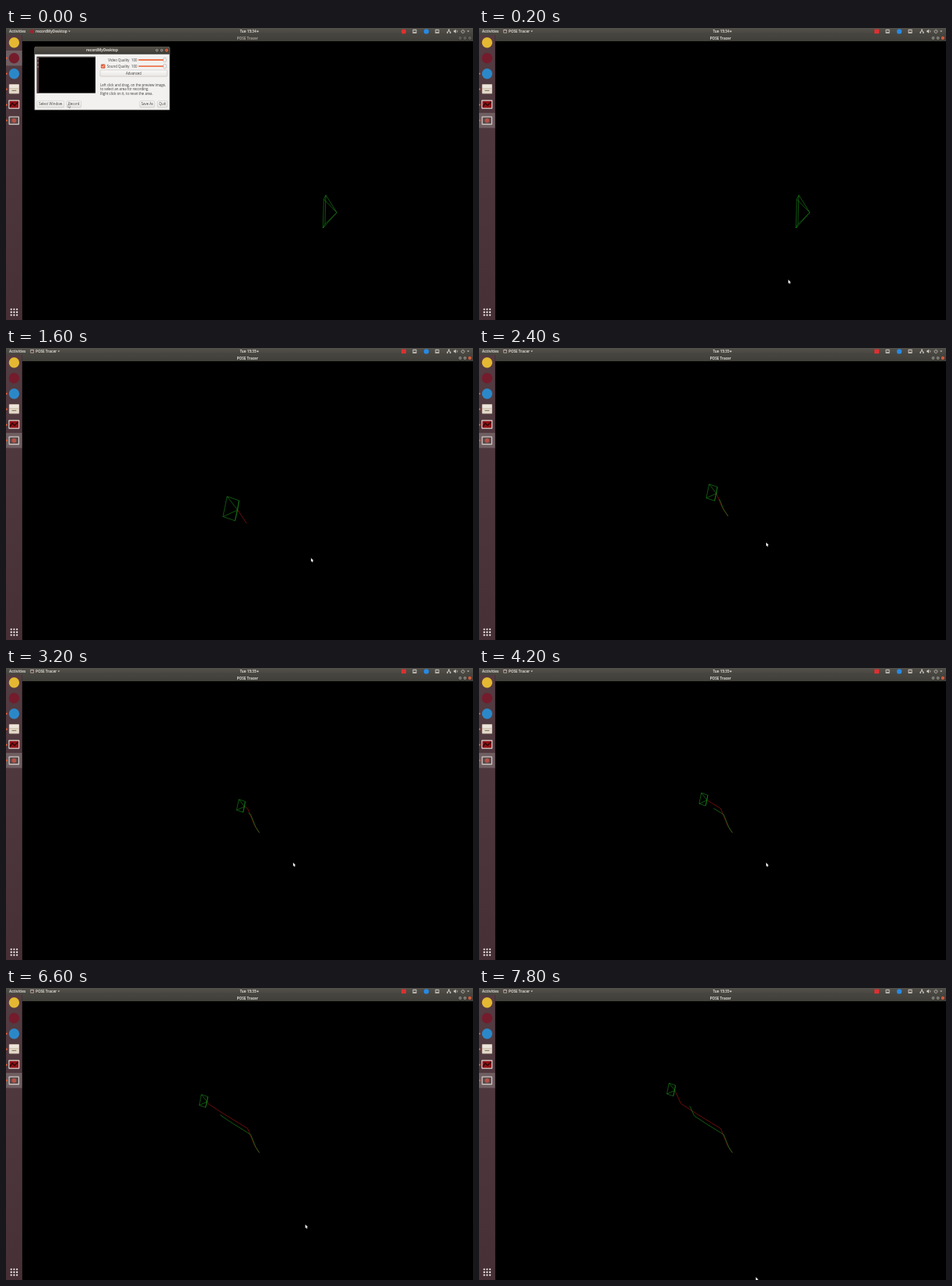
Animation of 600x375 px, one loop 8 s. Source, as an HTML page with a canvas:

```html
<!DOCTYPE html>
<html lang="en">
<head>
<meta charset="utf-8">
<title>Camera path</title>
<style>
html, body { margin: 0; width: 100%; height: 100%; overflow: hidden; background: #000; }
canvas { display: block; width: 600px; height: 375px; }
</style>
</head>
<body>
<canvas id="stage"></canvas>
<script>
const LOOP = 8000, STEP = 200;
const APP = 'POSE Tracer';
const GREEN = '#1a821a', RED = '#a61414', ORANGE = '#e6603a', PALE = '#d3d0c9';
const canvas = document.getElementById('stage');
const ctx = canvas.getContext('2d');
const ratio = window.devicePixelRatio || 1;
canvas.width = 600 * ratio;
canvas.height = 375 * ratio;
ctx.scale(ratio, ratio);

// Key points: time, x, y.
const origin = [[200, 425, 237], [1600, 309, 225], [2800, 325.5, 211.5]];
const cameraPath = [
  [200, 0, 0], [1600, -6, -9], [2900, -15, -31],
  [5200, -46, -50], [6400, -66, -63], [7800, -74, -80]
];
const pointer = [
  [200, 397.5, 323.5], [1600, 392, 270], [2400, 369, 250],
  [5200, 369, 250.5], [6600, 384.7, 304], [7400, 355.8, 371.5]
];

const progress = (t, from, to) => Math.min(1, Math.max(0, (t - from) / (to - from)));
const mix = (a, b, k) => a.map((v, i) => v + (b[i] - v) * k);

function sample(track, t) {
  const next = track.findIndex(row => row[0] > t);
  if (next <= 0) return track.at(next).slice(1);
  const [a, b] = [track[next - 1], track[next]];
  return mix(a, b, progress(t, a[0], b[0])).slice(1);
}

function rect(x, y, w, h, fill) {
  ctx.fillStyle = fill;
  ctx.fillRect(x, y, w, h);
}

function rounded(x, y, w, h, r, fill, stroke) {
  ctx.beginPath();
  ctx.roundRect(x, y, w, h, r);
  ctx.fillStyle = fill;
  ctx.fill();
  if (stroke) {
    ctx.strokeStyle = stroke;
    ctx.lineWidth = .5;
    ctx.stroke();
  }
}

function disc(x, y, r, fill) {
  ctx.beginPath();
  ctx.arc(x, y, r, 0, 7);
  ctx.fillStyle = fill;
  ctx.fill();
}

function arc(x, y, r, from, to) {
  ctx.beginPath();
  ctx.arc(x, y, r, from, to);
  ctx.strokeStyle = PALE;
  ctx.lineWidth = .7;
  ctx.stroke();
}

function line(points, stroke, width = .65, close = false) {
  ctx.beginPath();
  points.forEach(([x, y]) => ctx.lineTo(x, y));
  if (close) ctx.closePath();
  ctx.strokeStyle = stroke;
  ctx.lineWidth = width;
  ctx.stroke();
}

function shape(points, fill) {
  ctx.beginPath();
  points.forEach(([x, y]) => ctx.lineTo(x, y));
  ctx.fillStyle = fill;
  ctx.fill();
}

function text(value, x, y, { size = 4.4, fill = '#3c3c3c', align = 'left', bold = false } = {}) {
  ctx.font = `${bold ? 'bold ' : ''}${size}px "Open Sans", "Noto Sans", sans-serif`;
  ctx.textAlign = align;
  ctx.fillStyle = fill;
  ctx.fillText(value, x, y);
  return ctx.measureText(value).width;
}

function vertical(y0, y1, from, to) {
  const gradient = ctx.createLinearGradient(0, y0, 0, y1);
  gradient.addColorStop(0, from);
  gradient.addColorStop(1, to);
  return gradient;
}

const caret = (x, y) => shape([[x, y], [x + 2.6, y], [x + 1.3, y + 1.6]], PALE);

function windowButtons(x, y, active) {
  for (let i = 0; i < 3; i++) {
    const cx = x + i * 6.2;
    disc(cx, y, 2.5, '#33322e');
    disc(cx, y, 2.1, !active ? '#65635c' : i === 2 ? ORANGE : '#85827a');
    rect(cx - .8, y - .2, 1.6, .5, '#3b3a35');
  }
}

function statusIcons() {
  for (const x of [525, 554]) {
    rounded(x - 2.6, 1.8, 5.2, 5.2, .6, '#bab7b0');
    rect(x - 1.6, 3.1, 3.2, 2, '#55534d');
  }
  disc(540, 4.4, 3.2, '#2789e4');
  for (const dx of [-1.8, 1.8]) {
    line([[569, 2.3], [569, 4.3], [569 + dx, 4.3], [569 + dx, 6]], PALE, .7);
    rect(568.2 + dx, 5.3, 1.6, 1.5, PALE);
  }
  rect(568.2, 1.6, 1.6, 1.5, PALE);
  shape([[575.3, 3.3], [576.4, 3.3], [578, 1.8], [578, 6.8], [576.4, 5.3], [575.3, 5.3]], PALE);
  arc(578, 4.3, 1.8, -1, 1);
  arc(587, 4.5, 2, -1, 4.1);
  line([[587, 1.7], [587, 4]], PALE, .7);
  caret(592.5, 3.6);
}

function bars(t, recording) {
  const label = { size: 4.6, fill: '#d6d3cc', bold: true };
  rect(0, 0, 600, 9, vertical(0, 9, '#53514a', '#45433d'));
  text('Activities', 4, 5.9, label);
  if (recording) {
    rounded(31.3, 2, 4.6, 4.4, .4, '#bcb8b1');
    rect(32, 3.2, 3.2, 2.5, '#5b403c');
    rect(508, 1.6, 6, 5.5, '#dc3030');
  } else {
    disc(33.5, 4.3, 2.6, '#9c2430');
    disc(511, 4.5, 3.1, '#e02f2f');
  }
  const width = text(recording ? APP : 'recordMyDesktop', 38, 5.9, label);
  caret(39.3 + width, 3.6);
  text(t < 1000 ? 'Tue 15:34' : 'Tue 15:35', 311, 5.9, { ...label, align: 'center' });
  disc(323.4, 4.3, 1.1, PALE);
  statusIcons();

  rect(21, 9, 579, 8, vertical(9, 17, '#474540', '#3f3e39'));
  text(APP, 310.3, 14.5, {
    ...label, align: 'center', fill: recording ? '#dedad2' : '#a5a198'
  });
  windowButtons(583.5, 12.9, recording);
}

function dock(recording) {
  const slot = i => 18.7 + i * 20;
  rect(0, 9, 21, 366, vertical(9, 375, '#533c42', '#463036'));
  rect(20.4, 9, .6, 366, '#3a282d');
  rect(0, slot(recording ? 5 : 1) - 9.7, 20.5, 19.4, '#6f5e62');

  ['#e4b832', '#741c2b', '#2b88c8'].forEach((fill, i) => disc(10.4, slot(i), 6.7, fill));

  rounded(3.8, 72, 13.2, 12.6, 1, '#c7b6a2');
  rect(4.5, 73, 11.8, 4.3, '#ece5db');
  rect(4.5, 78.2, 11.8, 5.5, '#e4d9ca');
  rect(7.5, 79.8, 5.8, 1.2, '#8c7b6a');

  rounded(3.3, 92.5, 14, 11.3, .8, '#e4dfda');
  rect(4.4, 93.7, 11.8, 8.9, '#8f1117');
  line([[5, 101], [8, 96.5], [11, 99.5], [15.5, 95]], '#2b0709', 1.4);

  rounded(3.5, 113.4, 13.5, 10.8, .8, '#d3cdc8');
  rect(4.7, 114.7, 11.1, 8.2, '#57494a');
  disc(10.3, 118.8, 2.9, '#b65249');

  for (let i = recording ? 2 : 1; i < 6; i++) disc(.8, slot(i), 1.1, ORANGE);
  for (let i = 0; i < 9; i++) {
    disc(6.7 + i % 3 * 3.7, 361.3 + Math.floor(i / 3) * 3.7, 1.15, '#eeebeb');
  }
}

// The image plane starts edge-on and turns to face the viewer.
function imagePlane(t) {
  const turn = progress(t, 200, 1600);
  const [cx, cy] = mix([-5.5, -.4], [-4.6, -1], turn);
  const [rx, ry] = mix([.45, -.9], [4.1, 1.4], turn);
  const [ux, uy] = mix([.2, -6.4], [1.4, -6.9], turn);
  return [[-1, 1], [1, 1], [1, -1], [-1, -1]]
    .map(([r, u]) => [cx + r * rx + u * ux, cy + r * ry + u * uy]);
}

function scene(t) {
  const [ox, oy] = sample(origin, t);
  const zoom = 2.9 - 1.9 * progress(t, 200, 2800);
  const toScreen = ([x, y]) => [ox + x * zoom, oy + y * zoom];
  const camera = sample(cameraPath, t);
  const trail = [...cameraPath.filter(row => row[0] <= t).map(row => row.slice(1)), camera];

  line(trail.map(toScreen), RED);
  // The estimated path has the same form but drifts short.
  if (t > 1600) line(trail.map(([x, y]) => toScreen([x * .74, y * .75])), GREEN, .7);

  const apex = toScreen(camera);
  const plane = imagePlane(t).map(([x, y]) => [apex[0] + x * zoom, apex[1] + y * zoom]);
  line(plane, GREEN, .65, true);
  plane.forEach(corner => line([apex, corner], GREEN));
}

function button(x, y, w, h, label) {
  rounded(x, y, w, h, 1, vertical(y, y + h, '#fbfaf9', '#e7e5e2'), '#bbb6b0');
  text(label, x + w / 2, y + h / 2 + 1.5, { align: 'center' });
}

function dialog() {
  rounded(36.7, 24, 173.6, 81.3, [2, 2, 0, 0], '#f2f1f0', '#44423d');
  rounded(36.7, 24, 173.6, 9.7, [2, 2, 0, 0], vertical(24, 33.7, '#555249', '#3d3b36'));
  text('recordMyDesktop', 123.5, 30.2, { size: 4.6, bold: true, fill: '#e2ded6', align: 'center' });
  windowButtons(193.9, 28.6, true);

  rect(39.7, 36.8, 75.2, 46.8, '#000');
  rect(39.7, 36.8, 75.2, 1.2, '#4b4944');
  rect(39.7, 38, 2.6, 45.6, '#49343a');
  for (let i = 0; i < 6; i++) rect(40.3, 39 + i * 2.6, 1.4, 1.2, i % 2 ? '#8c2832' : '#b5a493');

  ['Video Quality', 'Sound Quality'].forEach((label, i) => {
    const y = 41 + i * 8.1;
    text(label, 158.5, y + 1.6, { align: 'right' });
    text('100', 161, y + 1.6);
    rounded(170, y - .9, 34, 1.8, .9, '#ed764d');
    rounded(202.2, y - 2.6, 3.8, 5.2, 1.2, '#f4f2f0', '#9f9992');
  });
  rounded(122.3, 46.8, 4.8, 4.8, .6, ORANGE, '#bd4c28');
  line([[123.3, 49.2], [124.4, 50.4], [126.2, 47.8]], '#fff', .7);
  [
    'Left click and drag, on the preview image,',
    'to select an area for recording.',
    'Right click on it, to reset the area.'
  ].forEach((row, i) => text(row, 121, 75 + i * 5.3));
  button(121, 54, 86, 8.2, 'Advanced');
  button(40, 93.8, 34.4, 8.2, 'Select Window');
  button(78, 93.8, 18.4, 8.2, 'Record');
  button(172, 93.8, 18.8, 8.2, 'Save As');
  button(194.7, 93.8, 12.4, 8.2, 'Quit');
}

function arrow([x, y], edge) {
  const outline = [[0, 0], [0, 4.2], [.9, 3.4], [1.6, 5], [2.3, 4.7], [1.7, 3.2], [2.9, 3.1]]
    .map(([dx, dy]) => [x + dx, y + dy]);
  shape(outline, '#fff');
  line(outline, edge, .3, true);
}

function draw(elapsed) {
  const t = Math.floor(elapsed % LOOP / STEP) * STEP;
  const recording = t >= STEP;
  rect(0, 0, 600, 375, '#000');
  scene(t);
  bars(t, recording);
  dock(recording);
  if (!recording) dialog();
  arrow(recording ? sample(pointer, t) : [80, 98], recording ? '#ddd' : '#111');
}

const start = performance.now();
function loop() {
  draw(performance.now() - start);
  requestAnimationFrame(loop);
}
loop();
</script>
</body>
</html>
```
